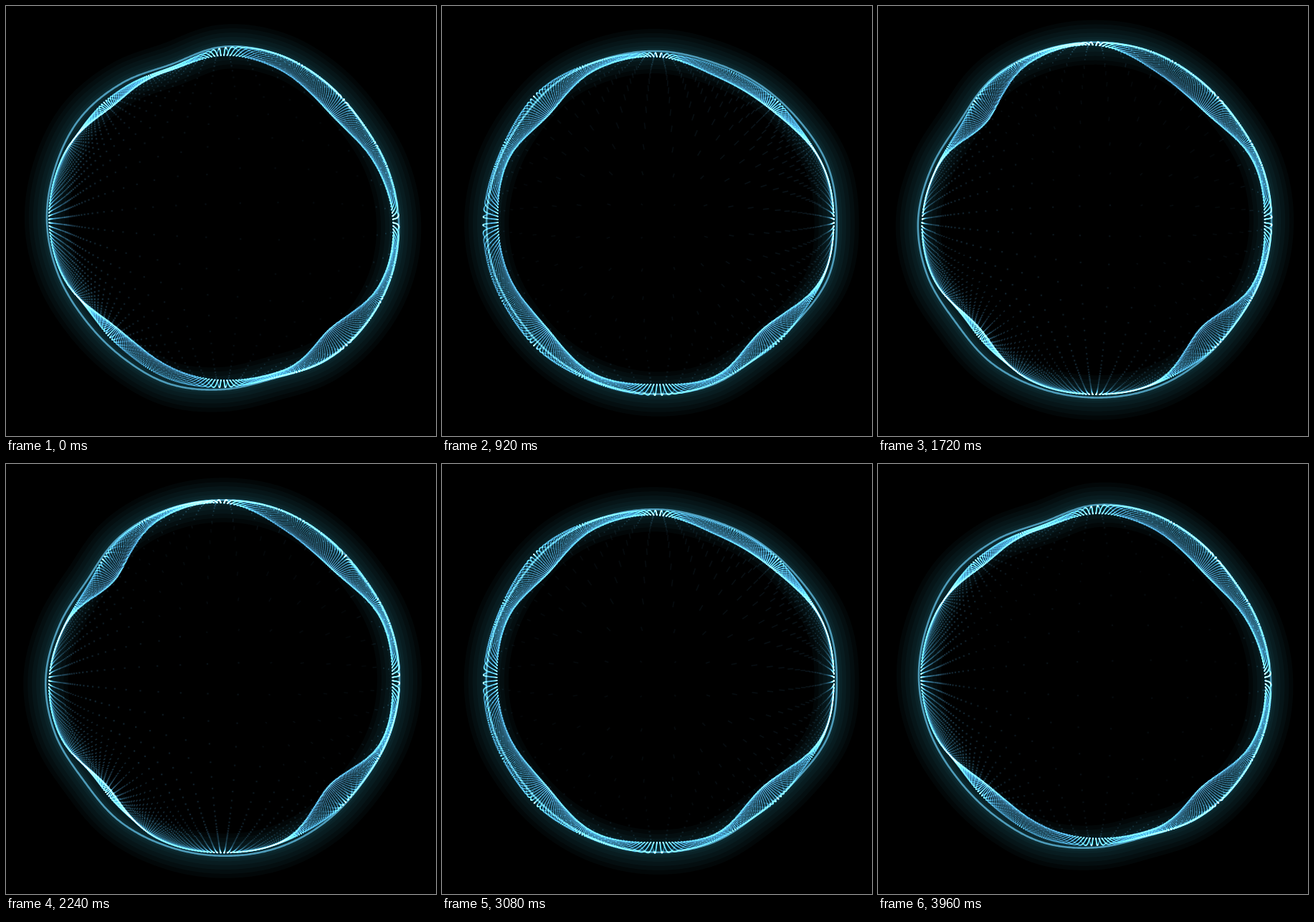
Animation, 600 px wide and 600 px high, one loop 4 s. Source, as an HTML page with a canvas:

```html
<!DOCTYPE html>
<html>
<head>
<meta charset="utf-8">
<style>
  html, body { margin: 0; width: 100%; height: 100%; overflow: hidden; background: #000; }
  canvas { display: block; width: 100vmin; height: 100vmin; }
</style>
</head>
<body>
<canvas id="stage" width="600" height="600"></canvas>
<script>
const ctx = document.getElementById("stage").getContext("2d");
const LOOP = 4000, STEP = 40, CX = 302, CY = 300, SLICES = 720, GRID = 110;

// Outline radius every 18 degrees, clockwise from the right, one row per pose.
const rims = [
  [246, 248, 246, 241, 231, 235, 239, 236, 236, 241, 245, 245, 245, 238, 230, 243, 245, 241, 238, 242],
  [249, 251, 232, 231, 239, 243, 243, 238, 239, 244, 245, 246, 245, 240, 236, 234, 234, 239, 240, 247],
  [248, 248, 247, 240, 242, 240, 239, 241, 237, 237, 236, 231, 230, 240, 241, 242, 237, 236, 242, 249],
  [247, 246, 243, 246, 248, 247, 246, 245, 240, 246, 247, 240, 234, 245, 249, 250, 250, 246, 243, 246]
];
// Depth of the folded veil inside the outline, every 22.5 degrees.
const folds = [
  [8, 12, 32, 8, 13, 24, 26, 6, 3, 5, 20, 8, 12, 20, 27, 15],
  [3, 4, 20, 10, 16, 6, 18, 6, 4, 18, 26, 16, 12, 20, 18, 4],
  [6, 16, 34, 10, 10, 14, 28, 28, 25, 5, 26, 5, 4, 16, 20, 12],
  [10, 8, 34, 8, 4, 5, 22, 5, 4, 10, 34, 10, 4, 24, 28, 10]
];
// Sheet height at the centre, its slope in x and y, outward puff of the veil.
const sheets = [
  [.09, -.35, .03, .05],
  [.045, -.04, .22, 0],
  [.15, .3, -.28, .6],
  [.1, -.3, .25, 0]
];

const cubic = (a, b, c, d, f) =>
  b + .5 * f * (c - a + f * (2 * a - 5 * b + 4 * c - d + f * (3 * (b - c) + d - a)));

function blend(poses, p) {
  const i = Math.min(2, Math.max(0, Math.floor(p))), f = p - i;
  return poses[i].map((b, k) => {
    const c = poses[i + 1][k];
    const a = i > 0 ? poses[i - 1][k] : 2 * b - c;
    const d = i < 2 ? poses[i + 2][k] : 2 * c - b;
    return f > 1 ? c + (f - 1) * (c - b) : cubic(a, b, c, d, f);
  });
}

// Smooth closed curve through evenly spaced values.
function around(values) {
  const n = values.length, v = k => values[(k + n) % n];
  return Array.from({ length: SLICES }, (_, s) => {
    const u = s / SLICES * n, i = Math.floor(u);
    return cubic(v(i - 1), v(i), v(i + 1), v(i + 2), u - i);
  });
}

const points = [];
for (let row = 0; row < GRID; row++) {
  for (let col = 0; col < GRID; col++) {
    const x = (col + .5) / GRID * 2 - 1, y = (row + .5) / GRID * 2 - 1;
    const dist = Math.hypot(x, y), q = Math.max(Math.abs(x), Math.abs(y));
    const angle = Math.atan2(y, x), w = Math.max(0, (q - .45) / .55);
    points.push({
      x, y, dist, cos: x / dist, sin: y / dist,
      slice: Math.floor((angle / (2 * Math.PI) + 1) * SLICES) % SLICES,
      flat: 1 - q * q,
      fold: w * w * (3 - 2 * w),
      puff: Math.sin(Math.PI * Math.min(1, q / .7)) ** 2
    });
  }
}

// The motion runs forward, then back.
function poseAt(t) {
  const s = Math.max(0, Math.min(t, 3980 - t));
  return s < 600 ? s / 600 : s < 1240 ? 1 + (s - 600) / 640 : 2 + (s - 1240) / 520;
}

const height = (pt, s) => (s[0] + s[1] * pt.x + s[2] * pt.y) * pt.flat;

function strokeRim(rim, width, color) {
  ctx.beginPath();
  rim.forEach((r, s) => {
    const a = s / SLICES * 2 * Math.PI;
    ctx.lineTo(CX + r * Math.cos(a), CY + r * Math.sin(a));
  });
  ctx.closePath();
  ctx.lineWidth = width;
  ctx.strokeStyle = color;
  ctx.stroke();
}

function draw(t) {
  const p = poseAt(t);
  const rim = around(blend(rims, p));
  const fold = around(blend(folds, p)).map(d => Math.max(2, d));
  const sheet = blend(sheets, p), trail = blend(sheets, Math.max(0, p - .05));

  ctx.globalCompositeOperation = "source-over";
  ctx.globalAlpha = 1;
  ctx.fillStyle = "#000";
  ctx.fillRect(0, 0, 600, 600);
  ctx.globalCompositeOperation = "lighter";
  for (const width of [62, 50, 38, 26, 15, 8]) strokeRim(rim, width, "rgba(40,120,150,.055)");
  strokeRim(rim, 2.6, "rgba(110,190,230,.6)");

  ctx.fillStyle = ctx.strokeStyle = "rgb(80,165,215)";
  ctx.lineWidth = 1.5;
  for (const pt of points) {
    const z = height(pt, sheet);
    const rho = pt.dist / Math.hypot(pt.dist, z);
    const edge = rim[pt.slice], depth = fold[pt.slice];
    const r = edge * rho - depth * pt.fold + depth * sheet[3] * pt.puff;
    const x = CX + r * pt.cos, y = CY + r * pt.sin;
    const alpha = Math.max(.5 * rho ** 12, Math.min(.4, 10 * z * z));
    if (alpha < .02) continue;

    const drift = rho < .9 ? edge * (pt.dist / Math.hypot(pt.dist, height(pt, trail)) - rho) : 0;
    if (Math.abs(drift) > 2) {
      const len = Math.max(-9, Math.min(9, drift));
      ctx.globalAlpha = alpha * .8;
      ctx.beginPath();
      ctx.moveTo(x, y);
      ctx.lineTo(x + len * pt.cos, y + len * pt.sin);
      ctx.stroke();
    } else {
      const size = rho < .9 ? 2.2 : 1.7;
      ctx.globalAlpha = alpha;
      ctx.fillRect(x - size / 2, y - size / 2, size, size);
    }
  }
}

function frame() {
  const t = performance.now() % LOOP;
  draw(Math.floor(t / STEP) * STEP);
  requestAnimationFrame(frame);
}
frame();
</script>
</body>
</html>
```
